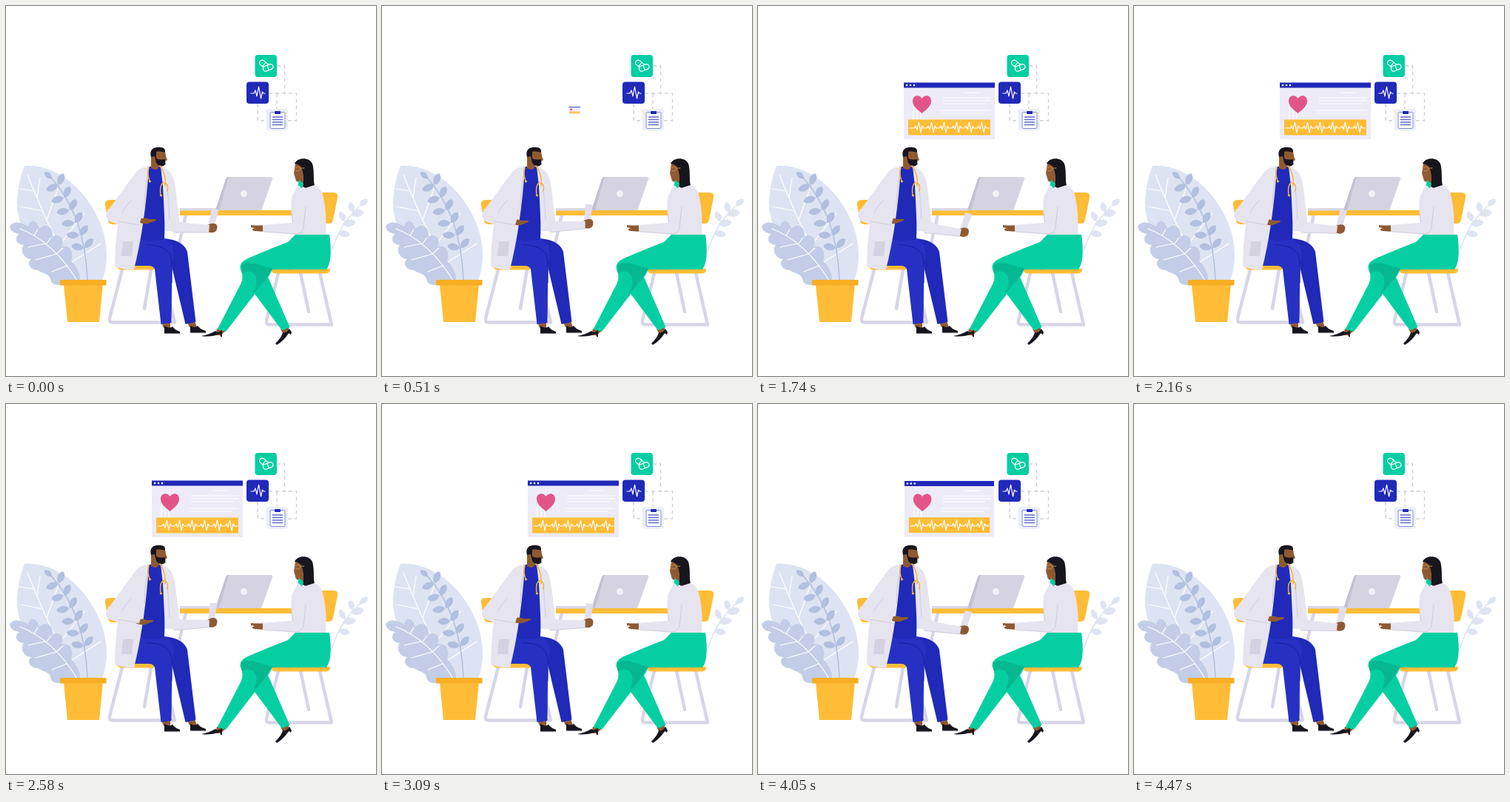
An HTML page for the animation above (4.5 s loop, 500 px wide and 500 px high).

```html
<!DOCTYPE html>
<html lang="en">
<head>
<meta charset="utf-8">
<title>Consultation</title>
<style>
html, body { margin: 0; width: 100%; height: 100%; overflow: hidden; background: #fff; }
svg { display: block; width: 100vw; height: 100vh; }
.blue { fill: #2029b8; } .yellow { fill: #ffbc36; } .green { fill: #05cfa2; }
.coat { fill: #e6e4ef; } .skin { fill: #8f5a32; } .dark { fill: #17161f; }
.grey { fill: #d5d2e2; }
.line { fill: none; stroke-linecap: round; stroke-linejoin: round; }
.frame { stroke: #d8d5e5; stroke-width: 4.5; }
.white { stroke: #fff; stroke-width: 1.2; }
.fold { stroke: #cfccdd; stroke-width: 1; }
</style>
</head>
<body>
<svg viewBox="0 0 500 500">
  <!-- icons -->
  <g class="line" stroke="#cfcfd8" stroke-width="1.4" stroke-dasharray="5 4" style="stroke-linecap:butt">
    <path d="M366 81H376.500V118M355 118H392.500V155H381M366 118V140M340 132V155H352"/>
  </g>
  <rect class="green" x="336.500" y="66" width="29.500" height="30" rx="4"/>
  <g class="line white">
    <g transform="rotate(38 349 79)"><rect x="342" y="75.500" width="14" height="7" rx="3.500"/><path d="M349 75.500v7"/></g>
    <g transform="rotate(-22 354 83)"><rect x="347" y="80" width="14" height="7" rx="3.500" fill="#05cfa2"/><path d="M354 80v7"/></g>
  </g>
  <rect class="blue" x="325" y="102.500" width="30" height="29.500" rx="4"/>
  <path class="line white" d="M331 118h4l2-4 2 8 2.500-13 3 16 2-9 1.500 2h2"/>
  <rect x="351.500" y="139" width="29.500" height="29.500" rx="4" fill="#edeffa"/>
  <rect x="357" y="143.500" width="20" height="22" rx="1.500" fill="#fff" stroke="#7f89d4"/>
  <rect class="blue" x="363" y="142" width="8" height="4" rx="1"/>
  <path d="M360 150h14M360 153.500h14M360 157h14M360 160.500h14" stroke="#5f69ca" stroke-width="1.500"/>

  <!-- popup window -->
  <g id="popup">
    <path d="M197 103.500H320V180H197z" fill="#ecebf6"/>
    <path class="blue" d="M197 103.500H320V110.500H197z"/>
    <g fill="#fff"><circle cx="201" cy="107" r="1.300"/><circle cx="206" cy="107" r="1.300"/><circle cx="211" cy="107" r="1.300"/></g>
    <path d="M210 137V153M215 141V153M220 143V153" class="line white"/>
    <path d="M221.500 145C215 140 209 135 209 128.500C209 120 218.500 119 221.500 125C225 119 234 120 234 128.500C234 135 228 140 221.500 145z" fill="#e25589"/>
    <path class="line white" d="M279 117H301M250 124H314M250 128H314M250 132H308M247 141H314M247 145H305"/>
    <path class="yellow" d="M203 153.500H314V174.500H203z"/>
    <path id="ecg" class="line white"/>
  </g>

  <!-- plant -->
  <path d="M25 216C50 214 79 227 99 249C121 273 136 304 136 336Q136 356 130 371H91C54 353 20 318 15 273Q14 244 25 216z" fill="#dde3f2"/>
  <g class="line white">
    <path d="M29 228C49 278 71 330 102 371M42 259L46 232M55 289L70 247M72 323L106 280M86 348L128 321M38 250L18 247M49 277L20 271M62 304L29 306"/>
  </g>
  <path d="M5 298C11 288 23 294 30 298C32 286 43 290 45 301C55 291 66 302 62 312C72 306 80 314 75 325C90 322 91 337 88 345Q98 353 101 371H88C78 379 64 379 61 372C59 361 52 363 43 357C33 357 27 348 34 342C25 342 18 331 24 323C13 322 11 313 18 308C11 307 6 304 5 298z" fill="#c3cde7"/>
  <path class="line white" d="M19 301C48 312 76 337 96 371M38 310L43 302M55 321L61 313M69 334L77 327M30 326L53 321M40 343L68 335M62 359L82 351"/>
  <g id="sprig" fill="#b2bfde"><path class="line" stroke="#b2bfde" stroke-width="1.500" d="M60 231Q107 282 110 370"/></g>
  <path class="yellow" d="M78 376H131L126 427H83z"/>
  <path d="M73 370H135.500V377.500H73z" fill="#f7ae24"/>
  <g id="twig" fill="#dfe4f1"><path class="line" stroke="#dfe4f1" stroke-width="1.600" d="M441 329Q452 292 482 267"/></g>

  <!-- chairs and table -->
  <g class="line frame">
    <path d="M157 356L140 422Q139 427.500 144 427.500H228L219 391M196 356L187 409"/>
    <path d="M368 361L352 425Q351 430.500 356 430.500H440L424 361M398 361L409 413"/>
    <path d="M243 282L234 321"/>
  </g>
  <path class="yellow" d="M140 262H158V295H144Q139 295 138 290L134 269Q133 262 140 262zM151 351H200V356.500H156Q151 356 149 351z"/>
  <path class="yellow" d="M427 252H443Q449 252 448 259L442 289Q441 294 436 294H425zM359 355H438Q438 361.500 432 361.500H364Q358 361 359 355z"/>
  <path class="yellow" d="M235 276H388V283H235z"/>
  <path d="M235 273H286V276.500H235z" fill="#dcd9e6"/>
  <path class="grey" d="M301 231H357Q361 231 360 234L345 276H283L297 234Q298 231 301 231z"/>
  <path d="M283 276L297 234Q298 231 301 231L288 276z" fill="#c3c0d2"/>
  <circle cx="321.500" cy="253.500" r="4.500" fill="#f2f0f7"/>

  <!-- doctor -->
  <path class="skin" d="M210 427H222V435H213zM244 426H255L258 434H248z"/>
  <path class="blue" d="M205 314C224 313 241 319 245 332L256.500 427L242.500 430L224 352L190 342z"/>
  <path d="M180 314H210C228 317 229 334 224.500 346L223.500 428L209.500 430L201 356Q199 351 193 351H172z" fill="#2631c4"/>
  <path class="line" d="M189 323C212 322 225 331 224 350L224 374" stroke="#171f98" stroke-width="1"/>
  <path class="dark" d="M214 432Q221 437 225 433Q228 438 235 440V443H214zM249 432Q256 436 259 432Q262 437 270 439V442H249z"/>
  <path d="M214 443H235M249 442H270" stroke="#e8e8ef" stroke-width="1"/>
  <path class="blue" d="M193 217H211L216 250L214 315Q197 320 179 315z"/>
  <path class="skin" d="M196 202H207V216Q205 224 196 219zM203 195H214Q216 199 216 203L218 208L215 210V214Q208 219 202 211z"/>
  <path class="dark" d="M196 204C193 193 201 190 209 191Q216 191 215 198Q207 195 203 197V206Q209 209 215 207L215.500 214Q209 220 203 212L201 203z"/>
  <path class="coat" d="M195 216C181 218 176 223 171 231L136 279C133 286 137 290 143 292L151 295Q147 326 147 352Q159 357 173 356Q188 296 193 218z"/>
  <path class="coat" d="M209 217C223 221 227 230 229 247L236 304H215L212 243z"/>
  <path class="line fold" d="M169 263Q155 277 153 293M193 219Q187 249 187 270M218 244L222 301"/>
  <path d="M158 318H172L170 338H156z" fill="#d4d1e0"/>
  <path class="line" d="M193 218Q190 226 194 236M208 216Q217 229 215 243M209 256Q207 239 214 239Q220 240 218 250" stroke="#f5b43c" stroke-width="1.500"/>
  <circle cx="194.500" cy="237" r="1.600" fill="#f5b43c"/><circle cx="209.500" cy="256" r="1.600" fill="#f5b43c"/>
  <g id="rest">
    <path class="skin" d="M179 288Q188 285 194 288L203 288Q204 290 200 291L192 294Q185 295 179 292z"/>
  </g>
  <path class="coat" d="M138 274L163 281L183 286L180 296L143 292Q134 288 138 274z"/>
  <path class="line fold" d="M152 291L180 296"/>
  <g id="arm">
    <path d="M278 273L287.500 275L281 299H273z" fill="#e1dfea"/>
    <path class="skin" d="M272 296Q280 292 284 295Q287 298 284 304Q280 308 272 305z"/>
    <path class="coat" d="M219 288Q230 290 241 293L275 296L274 306L226 306Q219 303 219 288z"/>
    <path class="line fold" d="M226 306L274 306"/>
  </g>

  <!-- patient -->
  <path class="skin" d="M285 436L297 439L290 445H283zM371 437L382 433L382 443L376 445z"/>
  <path class="green" d="M333 373L353 364L383.500 434L373 438.500L336 389z"/>
  <path class="green" d="M391 309H437Q442 344 433 356H360Q353 371 338 387L297 440L285.500 437L317 376Q322 366 317 356Q314 347 327 341Q357 328 381 319z"/>
  <path d="M318 350Q327 344 343 350Q360 357 388 356H359Q353 369 333 390Q343 370 335 362Q329 355 319 362z" fill="#05b891"/>
  <path class="dark" d="M264 446Q275 444 283 439Q286 443 292 438V447H290L289 443Q277 448 264 446zM364 456Q373 447 374 441Q379 443 383 436L386 441L385 444L382 442Q376 452 366 458z"/>
  <path class="skin" d="M391 213Q396 205 406 213L407 242H398L397 237Q392 239 391 233L389 226z"/>
  <path class="dark" d="M390 213C393 205 409 203 414 213C417 223 415 234 417 243Q408 249 401 244Q404 229 399 218Q395 213 390 213z"/>
  <path class="line" d="M391 219Q396 215 398 220Q396 225 391 222M398 219H403" stroke="#c68a39" stroke-width="1"/>
  <path class="green" d="M396 235L402 240L400 248L394 244z"/>
  <path class="coat" d="M395 242L401 247L417 242Q427 246 429 259Q434 282 432 309H389Q392 290 386 280Q383 259 395 242z"/>
  <path class="skin" d="M350 296Q341 297 331 296V299L336 300Q330 302 335 304L350 305z"/>
  <path class="coat" d="M391 250Q402 254 405 271L402 300Q400 308 391 308L347 305V296L386 293L386 273Q384 257 391 250z"/>
  <path class="line fold" d="M405 271L402 300Q400 308 391 308L348 305M386 280L388 293"/>
</svg>
<script>
const LOOP = 4500;
const $ = id => document.getElementById(id);
const ease = p => { p = Math.min(1, Math.max(0, p)); return p * p * (3 - 2 * p); };

// Small leaves, placed by base point, angle and length.
function leaves(id, list) {
  const ns = 'http://www.w3.org/2000/svg';
  for (const [x, y, angle, len] of list) {
    const leaf = document.createElementNS(ns, 'path');
    const w = len * 0.36;
    leaf.setAttribute('d', `M0 0C${len * .25} ${-w} ${len * .8} ${-w} ${len} 0C${len * .8} ${w} ${len * .25} ${w} 0 0z`);
    leaf.setAttribute('transform', `translate(${x} ${y}) rotate(${angle})`);
    $(id).append(leaf);
  }
}
const sprig = [[62, 233, -140, 13]];
for (let i = 0; i < 6; i++) {
  const x = 70 + i * 8 - i * i * .2, y = 242 + i * 17;
  sprig.push([x, y, 155 + i * 7, 17], [x + 1, y, -68 + i * 4, 17]);
}
leaves('sprig', sprig);
leaves('twig', [[478, 270, -40, 14], [469, 279, -107, 15], [466, 282, -12, 18],
  [458, 291, -118, 15], [455, 295, -10, 18], [449, 306, 12, 16]]);

let beat = 'M205 165h6';
for (let i = 0; i < 6; i++) beat += 'l2-3 2 5 2.500-10 2.500 14 2-9 2 3h4';
$('ecg').setAttribute('d', beat);

// Resting hand: time, horizontal and vertical offset.
const restKeys = [[0, 0, 0], [510, -5, 2], [1170, -4, 4], [1740, -6, 0],
  [2580, -4, 4], [3600, 0, 0], [LOOP, 0, 0]];
function restAt(t) {
  const i = restKeys.findIndex(k => k[0] > t);
  const a = restKeys[i - 1], b = restKeys[i];
  const p = ease((t - a[0]) / (b[0] - a[0]));
  return [1, 2].map(n => a[n] + (b[n] - a[n]) * p);
}

function draw(now) {
  const t = now % LOOP;
  const size = ease((t - 400) / 500) * (1 - ease((t - 4020) / 420));
  $('popup').setAttribute('transform', `translate(260.500 141) scale(${size}) translate(-260.500 -141)`);
  const swing = Math.sin(t / LOOP * 4 * Math.PI);
  $('arm').setAttribute('transform', `rotate(${-6 * swing} 223 297)`);
  $('rest').setAttribute('transform', `translate(${restAt(t)})`);
  requestAnimationFrame(draw);
}
draw(0);
const start = performance.now();
requestAnimationFrame(function first(now) { draw(Math.max(0, now - start)); });
</script>
</body>
</html>
```
